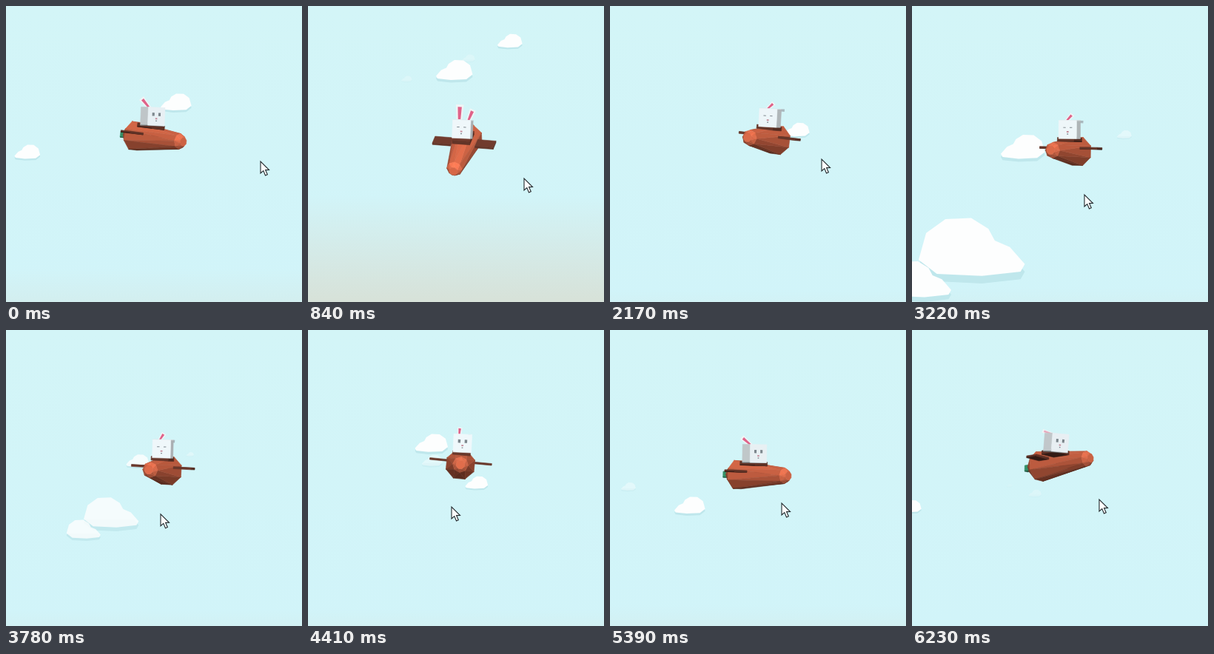
Recreate the animation shown at these times as an HTML page with a canvas. Size 400x400 px, loop 6300 ms.

```html
<!DOCTYPE html>
<html lang="en">
<head>
<meta charset="utf-8">
<title>Carrot flight</title>
<style>
  html, body { margin: 0; width: 100%; height: 100%; overflow: hidden; background: #d2f5f8; }
  canvas { display: block; width: 400px; height: 400px; }
</style>
</head>
<body>
<canvas id="stage" width="400" height="400"></canvas>
<script>
const ctx = document.getElementById('stage').getContext('2d');
const LOOP = 6300, STEP = 70;

// Flight path: time, cursor x and y, plane height, then yaw, pitch and roll in degrees
const PATH = [
  [0, 344, 210, 178, 45, 5, 5],
  [840, 292, 233, 191, -14, 30, 5],
  [2170, 286, 207, 180, -25, -2, 6.5],
  [3220, 233, 255, 196, -23, -1, 1],
  [4410, 194, 239, 182, 0, 0, 5.5],
  [5390, 232, 234, 196, 47, 1, 2],
  [6230, 253, 229, 181, 48, -7, 10]
];
// Clouds: moment, place and width at that moment
const CLOUDS = [
  [0, 230, 131, 42], [0, 29, 198, 35],
  [840, 198, 88, 50], [840, 273, 48, 34],
  [2170, 253, 168, 34],
  [3220, 150, 192, 60], [3220, 80, 330, 145], [3220, 8, 372, 90], [3220, 287, 174, 20],
  [4410, 167, 154, 45], [4410, 168, 177, 28], [4410, 228, 207, 31],
  [5390, 108, 238, 42], [5390, 25, 212, 20],
  [6230, -2, 239, 30]
];
const PUFF = [[-.49, .09], [-.42, -.16], [-.24, -.29], [0, -.3], [.16, -.2], [.22, -.09],
  [.36, -.03], [.5, .13], [.46, .2], [.1, .24], [-.32, .22]];
const ARROW = [[0, 0], [0, 16], [3.8, 12.6], [6.5, 19], [9.3, 17.8], [6.6, 11.6], [11.5, 11.5]];

const rad = a => a * Math.PI / 180;
const clamp = (v, lo, hi) => Math.max(lo, Math.min(hi, v));
const dot = (a, b) => a[0] * b[0] + a[1] * b[1] + a[2] * b[2];
const sub = (a, b) => a.map((v, i) => v - b[i]);
const cross = (a, b) => [a[1] * b[2] - a[2] * b[1], a[2] * b[0] - a[0] * b[2], a[0] * b[1] - a[1] * b[0]];
const unit = a => { const l = Math.hypot(...a); return a.map(v => v / l); };
const mean = ps => [0, 1, 2].map(k => ps.reduce((s, p) => s + p[k], 0) / ps.length);
const rgb = (c, b) => `rgb(${c.map(v => Math.min(255, Math.round(v * b))).join()})`;

// Cubic through the keys, flat at every turning point
function slope(i, c) {
  const [a, b, d] = [PATH[i - 1], PATH[i], PATH[i + 1]];
  if (!a || !d) return 0;
  const p = (b[c] - a[c]) / (b[0] - a[0]), q = (d[c] - b[c]) / (d[0] - b[0]);
  return p * q <= 0 ? 0 : 2 * p * q / (p + q);
}
function flight(t) {
  let i = 0;
  while (i < PATH.length - 2 && t >= PATH[i + 1][0]) i++;
  const a = PATH[i], b = PATH[i + 1], d = b[0] - a[0];
  const u = clamp((t - a[0]) / d, 0, 1), v = 1 - u;
  const [, x, y, height, yaw, pitch, roll] = a.map((p, c) =>
    p * v * v * (1 + 2 * u) + b[c] * u * u * (3 - 2 * u) + d * u * v * (slope(i, c) * v - slope(i + 1, c) * u));
  return { x, y, height, yaw, pitch, roll };
}

// Turned axes at a screen point; the model is x right, y up, z forward
function view(ox, oy, yaw, pitch, roll) {
  const [s, c] = [Math.sin(rad(yaw)), Math.cos(rad(yaw))];
  const [sp, cp] = [Math.sin(rad(pitch)), Math.cos(rad(pitch))];
  const [sr, cr] = [Math.sin(rad(roll)), Math.cos(rad(roll))];
  const r = [c, 0, -s], u = [s * sp, cp, c * sp], f = [s * cp, -sp, c * cp];
  const right = r.map((v, i) => v * cr - u[i] * sr), up = u.map((v, i) => v * cr + r[i] * sr);
  const row = k => [right[k], up[k], f[k]];
  return {
    eye: row(2),
    at: p => [ox + dot(p, row(0)), oy - dot(p, row(1))]
  };
}

function poly(points, fill, stroke, width = .6) {
  ctx.beginPath();
  points.forEach(p => ctx.lineTo(p[0], p[1]));
  ctx.closePath();
  if (fill) { ctx.fillStyle = fill; ctx.fill(); }
  if (stroke) { ctx.strokeStyle = stroke; ctx.lineWidth = width; ctx.stroke(); }
}

function box(x0, x1, y0, y1, z0, z1, color) {
  const points = [];
  for (const x of [x0, x1]) for (const y of [y0, y1]) for (const z of [z0, z1]) points.push([x, y, z]);
  const faces = [[0, 1, 3, 2], [4, 5, 7, 6], [0, 1, 5, 4], [2, 3, 7, 6], [0, 2, 6, 4], [1, 3, 7, 5]];
  return { points, faces, color };
}
// Octagonal rings joined by bands of triangles
function carrot(color) {
  const N = 8, rings = [[-42, 9], [-29, 20.5], [58, 10.5], [65, 6]];
  const points = [], faces = [];
  rings.forEach(([z, r], j) => {
    for (let i = 0; i < N; i++) {
      const a = (i + j / 2) * 2 * Math.PI / N;
      points.push([r * Math.cos(a), r * Math.sin(a), z]);
      if (j === rings.length - 1) continue;
      const p = j * N + i, q = j * N + (i + 1) % N;
      faces.push([p, q, p + N], [q, p + N, q + N]);
    }
  });
  faces.push([...Array(N).keys()].map(i => 3 * N + i));
  return { points, faces, color, cap: 2 * N };
}
const WOOD = [128, 68, 52];
const BODY = carrot([246, 119, 82]);
const LEAF = box(-3, 3, -4, 4, -53, -41, [70, 195, 140]);
const WINGS = [-1, 1].map(side => ({ side, ...box(side * 17, side * 42, 3, 5.5, -14, 4, WOOD) }));
const SEAT = box(-12, 12, 13, 18, -14, 14, WOOD);
const SKULL = box(-12.3, 12.3, -12.3, 12.3, -12.3, 12.3, [292, 302, 306]);

function solid(s, v) {
  const mid = mean(s.points);
  s.faces.forEach((face, i) => {
    const ps = face.map(k => s.points[k]);
    let n = unit(cross(sub(ps[1], ps[0]), sub(ps[2], ps[0])));
    if (dot(n, sub(mean(ps), mid)) < 0) n = n.map(c => -c);
    const facing = dot(n, v.eye);
    if (facing <= 0) return;
    let light = .54 + .28 * facing + .2 * n[1];
    if (s.cap) light += .015 * Math.sin(i * 2.3) + (Math.min(...face) >= s.cap ? .1 : 0);
    const tone = rgb(s.color, light);
    poly(ps.map(v.at), tone, tone);
  });
}

function drawPlane(v) {
  const near = w => w.side * v.eye[0] > .1;
  solid(LEAF, v);
  WINGS.filter(w => !near(w)).forEach(w => solid(w, v));
  solid(BODY, v);
  WINGS.filter(near).forEach(w => solid(w, v));
  solid(SEAT, v);
}

// An ear of length 22 folding back by the given angle
function drawEar([x, y], lean, splay, yaw) {
  const dx = splay - 22 * Math.sin(rad(lean)) * Math.sin(rad(yaw)), dy = -22 * Math.cos(rad(lean));
  const len = Math.hypot(dx, dy) || 1, w = 3 + .3 * Math.abs(dy);
  const open = clamp((-dy - 3) / 4, 0, 1);
  const blade = (from, to, a, b, fill) => {
    const at = (k, s) => [x + dx * k - dy / len * s, y + dy * k + dx / len * s];
    poly([at(from, -a), at(to, -b), at(to, b), at(from, a)], fill);
  };
  blade(0, 1, w * .38, w * .55, open > .5 ? '#f0f4f5' : '#a9b8be');
  ctx.globalAlpha = open;
  blade(.1, .86, w * .18, w * .28, '#df6289');
  ctx.globalAlpha = 1;
}

function drawHead(v, { yaw, pitch }) {
  const lean = 62 - 2.1 * pitch;
  drawEar(v.at([7, 11, 0]), Math.min(lean + 45, 92), 3, yaw);
  drawEar(v.at([-5, 11, 0]), lean, 1, yaw);
  solid(SKULL, v);
  const mark = (x, y, w, h, fill) =>
    poly([[-1, -1], [1, -1], [1, 1], [-1, 1]].map(([a, b]) => v.at([x + a * w / 2, y + b * h / 2, 12.3])), fill);
  const eye = 4.4 * clamp(1 + yaw / 14, .22, 1);
  mark(-4.5, 2.8, 3.4, eye, '#7d878d');
  mark(4.5, 2.8, 3.4, eye, '#7d878d');
  mark(0, -3, 2.8, 1.8, '#c48a99');
  mark(0, -6, 1.8, 1.4, '#7d878d');
}

// Clouds shrink towards the distance and follow the pitch of the camera
function drawCloud([t0, x, y, w], t, pitch) {
  const age = (t - t0) / 600;
  if (age < -.85) return;
  const k = 1 / (1 + age), fade = clamp((k - .38) * 6, 0, 1);
  if (!fade) return;
  const cx = 208 + (x - 208) * k;
  const cy = 165 + (y - 165) * k - 3.2 * (pitch - flight(t0).pitch);
  const side = w > 80 ? 1 : -1;
  const puff = (lift, fill) => poly(PUFF.map(p => [cx + p[0] * w * k * side, cy + (p[1] + lift) * w * k]), fill);
  ctx.globalAlpha = fade * (w < 30 ? .4 : 1);
  ctx.save();
  ctx.beginPath();
  ctx.rect(0, cy + .1 * w * k, 400, 400);
  ctx.clip();
  puff(.07, '#bfe7ec');
  ctx.restore();
  puff(0, '#fdfefe');
  ctx.globalAlpha = 1;
}

function fillDown(from, to, top, bottom) {
  const g = ctx.createLinearGradient(0, from, 0, to);
  g.addColorStop(0, top);
  g.addColorStop(1, bottom);
  ctx.fillStyle = g;
  ctx.fillRect(0, from, 400, 400);
}

function draw(t) {
  const now = flight(t), { yaw, pitch, roll } = now;
  const haze = 376 - 4 * pitch;
  fillDown(0, 400, '#d3f5f7', '#d1f4f9');
  fillDown(haze, haze + 140, 'rgba(215,226,217,0)', 'rgb(215,226,217)');
  CLOUDS.forEach(c => drawCloud(c, t, pitch));
  const plane = view(206 - 17 * Math.sin(rad(yaw)), now.height, yaw, pitch, roll);
  drawPlane(plane);
  drawHead(view(...plane.at([0, 29, 1]), yaw * .53, 0, roll * .5), now);
  poly(ARROW.map(p => [now.x + p[0], now.y + p[1]]), '#fff', '#22282c', 1.1);
}

function tick() {
  draw(Math.floor(performance.now() % LOOP / STEP) * STEP);
  requestAnimationFrame(tick);
}
tick();
</script>
</body>
</html>
```
